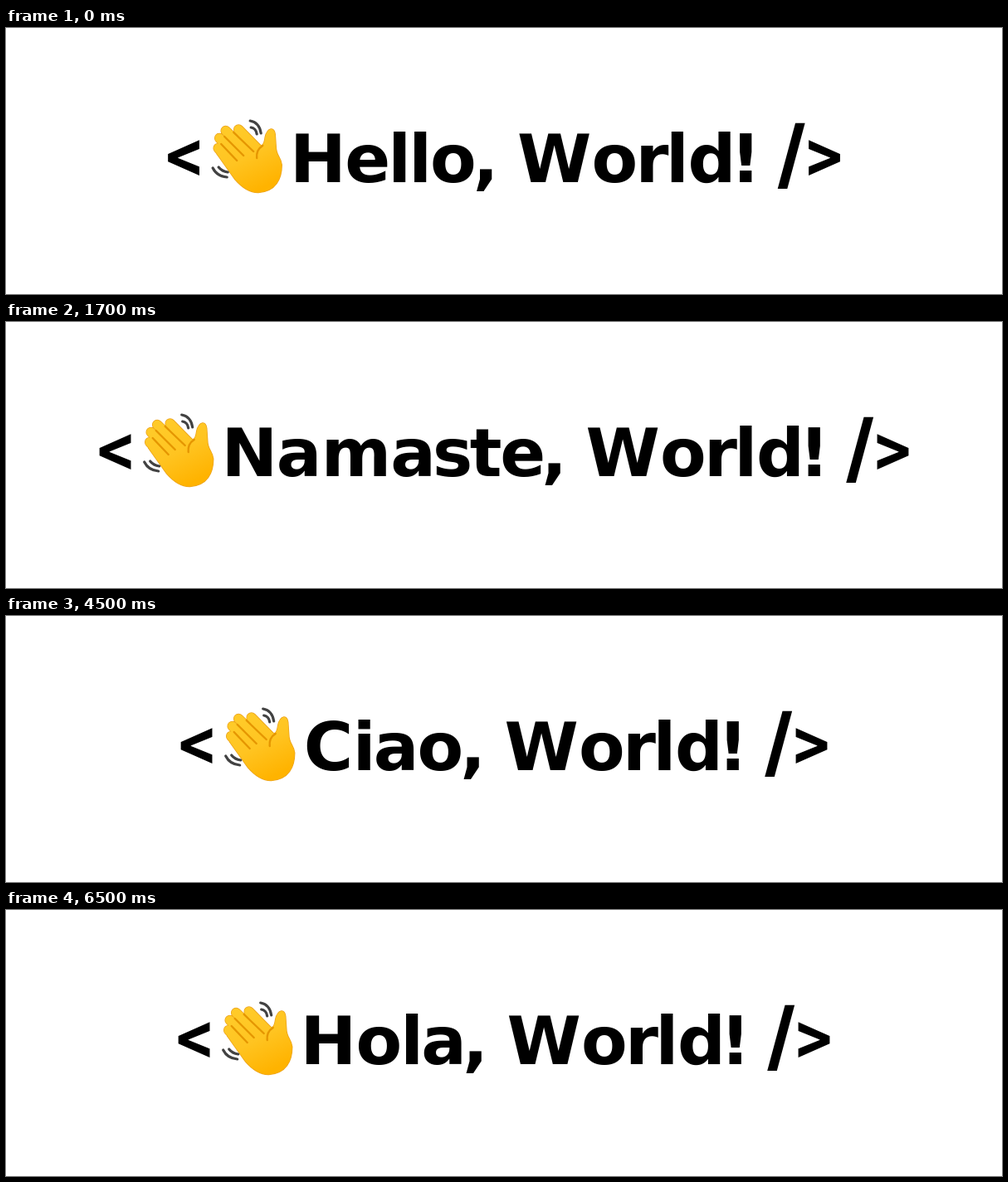
Recreate the animation shown at these times as an HTML page. Size 1200 by 321 pixels, loop 8000 ms.

```html
<!DOCTYPE html>
<html lang="en">
<head>
<meta charset="utf-8">
<title>Hello, World!</title>
<style>
  html, body { margin: 0; width: 100%; height: 100%; overflow: hidden; background: #fff; }
  svg { display: block; width: 100vw; height: 100vh; }
  text { font: 700 81px Montserrat, "DejaVu Sans", sans-serif; text-anchor: middle; white-space: pre; }
  .angle, .slash { font-family: Montserrat, Inter, sans-serif; }
  .angle { font-size: 76px; }
  .slash { font-size: 91px; }
  .lines { fill: none; stroke-linecap: round; stroke-linejoin: round; }
</style>
</head>
<body>
<svg viewBox="0 0 1200 321">
  <defs>
    <linearGradient id="skin" gradientUnits="userSpaceOnUse" x1="82" y1="125" x2="116" y2="192">
      <stop offset="0" stop-color="#ffca28"/>
      <stop offset=".45" stop-color="#ffc421"/>
      <stop offset="1" stop-color="#ffb300"/>
    </linearGradient>
    <path id="fingers" class="lines" d="M61.500 145 92 179M63 133 95 166M70.500 124 105 157M86 122.500 113 150"/>
    <path id="palm" d="M60 152 82 183Q96 199 110 198.500C131 197 138 182 138 165C137 156 131 154 131 143
      L130 128Q129 121.500 125 122Q120 123 118 132C117 139 115 145 110 140L86 130Z"/>
  </defs>
  <g id="line">
    <g>
      <g stroke="#eba21b">
        <use href="#fingers" stroke-width="12.500"/>
        <use href="#palm" fill="#eba21b" stroke-width="1.500" stroke-linejoin="round"/>
      </g>
      <use href="#fingers" stroke="url(#skin)" stroke-width="11"/>
      <use href="#palm" fill="url(#skin)"/>
      <path class="lines" stroke="#e59600" stroke-width="2.400"
        d="M65 140 84 160M69 131 92 154M80 126 104 149M115 142Q107 147 108 157"/>
      <path class="lines" stroke="#424242" stroke-width="3.200"
        d="M100 112Q111 114 113 127M101 120Q107 121 108 128M55 169Q60 179 72 180M62 168Q66 173 73 174"/>
    </g>
    <text id="label"></text>
  </g>
</svg>
<script>
  const $ = id => document.getElementById(id);
  const greetings = ["Hello", "Namaste", "Bonjour", "Ciao", "Hola"];
  const advance = {
    H: 67.5, N: 67.5, B: 64.5, C: 61.5, W: 91, a: 52, d: 58.5, e: 52, i: 25, j: 25.5, l: 25, m: 85.5,
    n: 57.4, o: 54.5, r: 35.6, s: 43, t: 37, u: 57, ",": 24, "!": 23, " ": 25, "/": 37, "<": 41, ">": 41
  };
  const angle = 'class="angle" y="179"';
  const marks = { "<": angle, ">": angle, "/": 'class="slash" y="184"' };
  const handGap = 107;
  let shown = -1;

  function show(index) {
    if (index === shown) return;
    shown = index;
    let pen = 0;
    $("label").innerHTML = [...`<${greetings[index]}, World! />`].map(c => {
      const x = pen + advance[c] / 2;
      pen += advance[c] + (c === "<" ? handGap : 0);
      return `<tspan x="${x}" ${marks[c] || 'y="186"'}>${c.replace("<", "&lt;")}</tspan>`;
    }).join("");
    $("line").setAttribute("transform", `translate(${(1200 - pen) / 2})`);
  }

  const start = performance.now();
  function tick() {
    const t = (performance.now() - start) % 8000;
    show(Math.floor((t + 1500) / 2000));
    requestAnimationFrame(tick);
  }
  tick();
</script>
</body>
</html>
```
